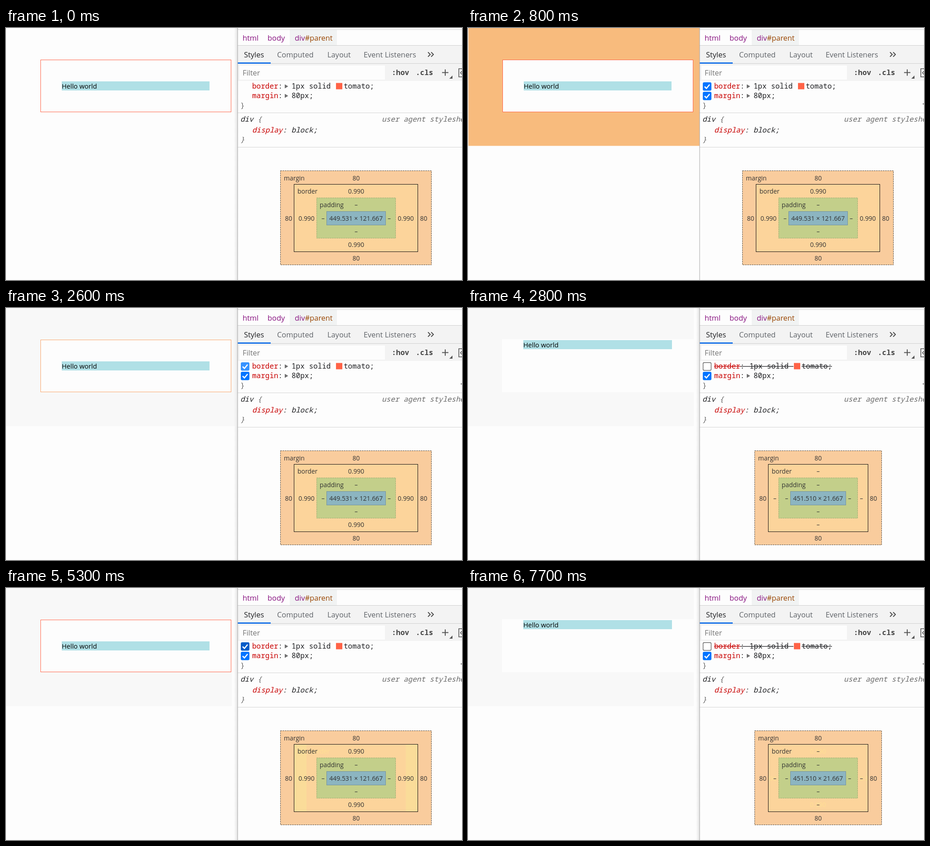
Animation of 1006 by 557 pixels, one loop 8 s. Source, as an HTML page with a canvas:

```html
<!DOCTYPE html>
<html lang="en">
<head>
<meta charset="utf-8">
<title>Toggling a border in the inspector</title>
<style>
html, body { margin: 0; height: 100%; overflow: hidden; background: #fdfdfd; }
canvas { display: block; }
</style>
</head>
<body>
<canvas id="stage" width="1006" height="557"></canvas>
<script>
const ctx = document.getElementById('stage').getContext('2d');
const LOOP = 8000;
const PAPER = '#fdfdfd', INK = '#202124', RED = '#c80000', TOMATO = '#ff6347', GHOST = '#ffdf94';
const sans = size => `${size}px "Open Sans", "Noto Sans", sans-serif`;
const mono = (style = '') => `${style} 16px "Noto Sans Mono", monospace`;

function box(x, y, w, h, color) {
  ctx.fillStyle = color;
  ctx.fillRect(x, y, w, h);
}

function outline(x, y, w, h, color, dash = []) {
  ctx.strokeStyle = color;
  ctx.lineWidth = 1;
  ctx.setLineDash(dash);
  ctx.strokeRect(x + 0.5, y + 0.5, w - 1, h - 1);
  ctx.setLineDash([]);
}

function text(str, x, y, font, color = INK, align = 'left') {
  ctx.font = font;
  ctx.fillStyle = color;
  ctx.textAlign = align;
  ctx.fillText(str, x, y);
}

function line(points, color, width) {
  ctx.strokeStyle = color;
  ctx.lineWidth = width;
  ctx.beginPath();
  points.forEach(([x, y]) => ctx.lineTo(x, y));
  ctx.stroke();
}

function triangle(points, color) {
  ctx.fillStyle = color;
  ctx.beginPath();
  points.forEach(([x, y]) => ctx.lineTo(x, y));
  ctx.fill();
}

function stateAt(t) {
  const between = (a, b) => t >= a && t < b;
  return {
    boxes: t >= 600,
    highlight: between(700, 1000),
    tinted: t >= 1000,
    cleared: t >= 2700,
    border: !between(2700, 5200) && t < 7600,
    metrics: !between(2800, 5300) && t < 7700,
    strips: between(5300, 7700),
    digits: t >= 7700,
    hover: t >= 1400,
    pressed: between(2600, 2700) || between(5100, 5200) || between(7500, 7600),
  };
}

function drawPage(s) {
  if (s.highlight) box(1, 0, 510, 260.5, '#f8bb7d');
  if (s.tinted) box(0, 0, s.cleared ? 498 : 505, 261, '#f8f8f8');
  if (s.cleared) box(75, 69, 423, 117, PAPER);
  if (s.border) {
    box(76, 70, 421, 116, PAPER);
    outline(76, 70, 421, 116, s.tinted && !s.cleared ? '#f9a56a' : TOMATO);
    box(123, 118, 326, 20, '#b0e0e6');
  } else {
    box(122, 71, 328, 20, '#b0e0e6');
  }
  const [x, y] = s.border ? [123, 134] : [122, 87];
  text('Hello world', x, y, sans(14.6), '#000');
  if (!s.highlight) {
    const shade = ctx.createLinearGradient(503, 0, 511, 0);
    shade.addColorStop(0, 'rgba(0,0,0,0)');
    shade.addColorStop(1, 'rgba(0,0,0,.1)');
    box(503, 0, 8, 557, shade);
  }
}

function drawToolbars() {
  box(511, 0, 495, 557, PAPER);
  box(626, 4, 104, 34, '#f1f3f3');
  box(511, 39, 495, 78, '#f3f3f3');
  for (const y of [3, 38, 78]) box(511, y, 495, 1, '#cfcfcf');
  text('html', 522, 28, sans(16.4), '#881280');
  text('body', 577, 28, sans(16.4), '#881280');
  text('div', 637, 28, sans(16.4), '#881280');
  text('#parent', 637 + ctx.measureText('div').width, 28, sans(16.4), '#994500');

  text('Styles', 525, 65, sans(16.4), INK);
  text('Computed', 598, 65, sans(16.4), '#5f6368');
  text('Layout', 709, 65, sans(16.4), '#5f6368');
  text('Event Listeners', 789, 65, sans(16.4), '#5f6368');
  for (const x of [931, 938]) line([[x, 53.5], [x + 5, 58.5], [x, 63.5]], '#444', 1.8);
  box(511, 76, 73, 3, '#1a73e8');

  box(515, 83, 321, 31, PAPER);
  text('Filter', 522, 105, sans(16.4), '#757575');
  text(':hov', 851, 104, mono('600'), '#444');
  text('.cls', 904, 104, mono('600'), '#444');
  box(962, 97.5, 14, 2, '#555');
  box(968, 91.5, 2, 14, '#555');
  triangle([[985, 105], [985, 112], [978, 112]], '#555');
  line([[1006, 90], [999, 90], [999, 108], [1006, 108]], '#555', 1.6);
  line([[1006, 95.5], [1002.5, 99], [1006, 102.5]], '#555', 1.5);
}

function checkbox(y, checked, color) {
  ctx.beginPath();
  ctx.roundRect(518, y - 9, 19, 18.5, 3);
  ctx.fillStyle = color;
  ctx.fill();
  if (checked) {
    line([[522, y + 0.5], [526, y + 4.5], [533, y - 4]], '#fff', 2.6);
  } else {
    ctx.beginPath();
    ctx.roundRect(519.2, y - 7.8, 16.6, 16.1, 2);
    ctx.fillStyle = '#fff';
    ctx.fill();
  }
}

function property(name, y) {
  text(name, 543, y, mono(), RED);
  text(':', 543 + ctx.measureText(name).width, y, mono());
}

function arrow(y) {
  triangle([[615, y - 4.5], [622.5, y], [615, y + 4.5]], '#6e6e6e');
}

function drawStyles(s) {
  property('border', 134);
  const shift = s.border ? 0 : -9;
  if (s.border) arrow(129);
  text('1px solid', 630 + shift, 134, mono());
  box(728 + shift, 121.5, 14, 14, TOMATO);
  text('tomato;', 745 + shift, 134, mono());
  if (!s.border) {
    box(543, 128.5, 58, 1.3, RED);
    box(601, 128.5, 117, 1.3, INK);
    box(736, 128.5, 67, 1.3, INK);
  }
  property('margin', 155);
  arrow(150);
  text('80px;', 630, 155, mono());
  text('}', 517, 177, mono(), '#666');
  if (s.boxes) {
    const color = s.border
      ? (s.pressed ? '#3793ff' : s.hover ? '#005cc8' : '#0075ff')
      : (s.pressed ? '#8d8d8d' : '#4f4f4f');
    checkbox(129, s.border, color);
    checkbox(150, true, '#0075ff');
    box(1003, 167, 3, 1.5, '#555');
  }

  box(511, 187, 495, 1, '#d4d4d4');
  text('div', 517, 207, mono('italic'));
  text('{', 555, 207, mono('italic'), '#666');
  text('user agent stylesheet', 829, 207, mono('italic'), '#6a6a6a');
  text('display', 543, 231, mono('italic'), RED);
  text(': block;', 610.2, 231, mono('italic'));
  text('}', 517, 252, mono('italic'), '#666');
  box(511, 263, 495, 1, '#d4d4d4');
}

function label(str, x, y, color = '#333') {
  text(str, x, y + 5, sans(13.9), color, 'center');
}

function drawMetrics(s) {
  const wide = s.metrics;
  const m = wide ? [605, 334] : [632, 281];
  const b = wide ? [635, 274] : [662, 221];
  const c = wide ? [707, 131] : [711, 123];
  const size = wide ? '0.990' : '–';

  box(m[0], 315, m[1], 209, '#f9cc9d');
  outline(m[0], 315, m[1], 209, '#444', [3, 2]);
  box(b[0], 345, b[1], 150, '#fcd49b');

  ctx.save();
  ctx.beginPath();
  ctx.rect(b[0], 345, b[1], 150);
  ctx.clip();
  if (s.strips && wide) {
    box(636, 346, 27, 148, '#fadc99');
    box(882, 346, 26, 148, '#fadc99');
    text('border', 670, 366, sans(13.9), GHOST);
  }
  if (s.digits) {
    for (const [x, y] of [[772, 361], [772, 479], [663, 421], [881.5, 421]]) label('0.990', x, y, GHOST);
  }
  ctx.restore();

  outline(b[0], 345, b[1], 150, '#111');
  box(685, 375, 175, 90, '#c3cf8a');
  outline(685, 375, 175, 90, '#9da873', [3, 2]);
  box(c[0], 405, c[1], 31, '#8cb5c1');
  outline(c[0], 405, c[1], 31, '#7593a0');

  text('margin', m[0] + 8, 337, sans(13.9), '#333');
  text('border', b[0] + 8, 366, sans(13.9), '#333');
  text('padding', 692, 396, sans(13.9), '#333');
  label('80', 772.5, 332);
  label('80', 772.5, 509);
  label(size, 772.5, 361);
  label(size, 772.5, 479);
  label('–', 772.5, 391);
  label('–', 772.5, 450);
  const sides = wide ? [623.5, 663, 699.5] : [650.5, 677, 703];
  ['80', size, '–'].forEach((str, i) => {
    label(str, sides[i], 421);
    label(str, 1545 - sides[i], 421);
  });
  label(wide ? '449.531 × 121.667' : '451.510 × 21.667', 772.3, 421);
}

function draw(now) {
  const s = stateAt(now % LOOP);
  box(0, 0, 1006, 557, PAPER);
  drawPage(s);
  drawToolbars();
  drawStyles(s);
  drawMetrics(s);
  box(510.5, 0, 1, 557, '#a3a3a3');
}

const start = performance.now();
function tick() {
  draw(performance.now() - start);
  requestAnimationFrame(tick);
}
tick();
</script>
</body>
</html>
```
